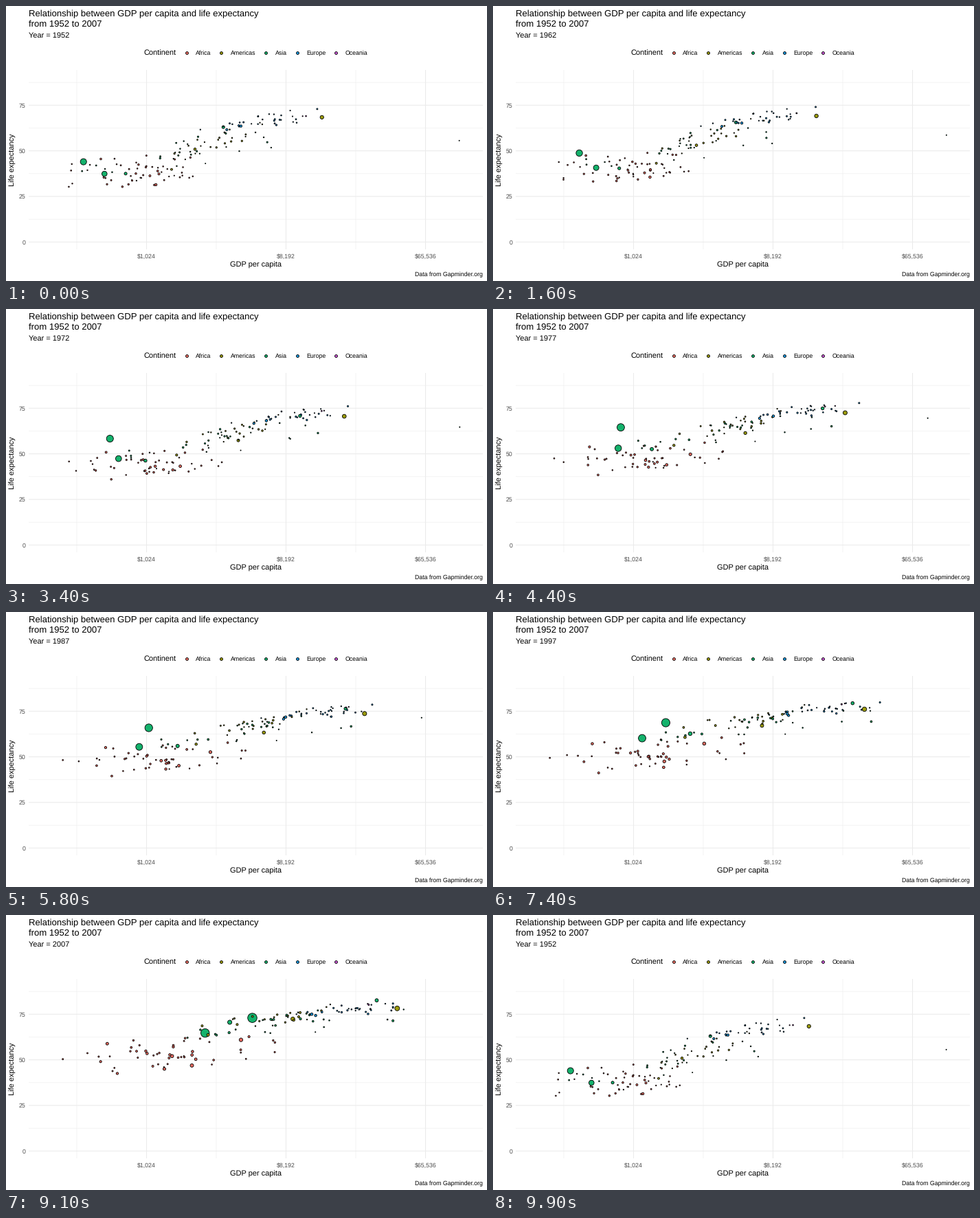
Animation of 700x400 px, one loop 10 s. Source, as a matplotlib script:

```python
import numpy as np
import matplotlib.pyplot as plt
from matplotlib.animation import FuncAnimation

W, H, DPI = 700, 400, 100
PT = 72 / DPI
STROKE = .85 * PT
plt.rcParams["font.family"] = "Liberation Sans"
plt.rcParams["text.hinting"] = "none"

COLORS = {"Africa": "#EC6C62", "Americas": "#9C9C0C", "Asia": "#14B26C",
          "Europe": "#1898E0", "Oceania": "#CC58D8"}
YEARS = np.arange(1952, 2008, 5)
AGE = (YEARS - 1952) / 55
KEYS = [1952, 1972, 1992, 2007]
# First frame of each year's points; the label moves one frame ahead.
STARTS = np.cumsum([0, 8, 9, 9, 9, 9, 7, 8, 8, 8, 8, 8, 8])

# The countries that stand out: continent, population in millions at both
# ends, then GDP per capita and life expectancy at the key years.
LEADERS = [
    ("Asia", (556, 1319), (400, 677, 1656, 4959), (44, 63.1, 68.7, 73)),
    ("Asia", (372, 1110), (547, 724, 1164, 2452), (37.4, 50.7, 60.2, 64.7)),
    ("Asia", (82, 224), (750, 1111, 2383, 3541), (37.5, 49.2, 62.7, 70.6)),
    ("Asia", (86, 127), (3217, 14779, 26825, 31656), (63, 73.4, 79.4, 82.6)),
    ("Asia", (.2, 2.5), (108382, 109348, 34933, 47307), (55.6, 67.7, 75.2, 77.6)),
    ("Americas", (158, 301), (13990, 21806, 32004, 42952), (68.4, 71.3, 76.1, 78.2)),
    ("Americas", (57, 190), (2109, 4986, 6950, 9066), (50.9, 59.5, 67.1, 72.4)),
    ("Africa", (33, 135), (1077, 1698, 1620, 2014), (36.3, 42.8, 47.5, 46.9)),
]

# Everyone else: count, log2 GDP (mean, sd), its growth (mean, sd),
# life (mean, sd, per unit of log2 GDP), life gained (mean, sd), population growth.
CROWDS = {
    "Africa": (51, (9.9, .85), (.55, .8), (39, 4.5, 1.5), (14.5, 6), 3.1),
    "Americas": (23, (11.5, .65), (1.3, .5), (54, 4, 7), (18.5, 2), 2.4),
    "Asia": (28, (10.7, 1.1), (2.1, .8), (47, 5, 5), (23, 4), 2.8),
    "Europe": (30, (12.45, .7), (1.9, .3), (66, 2, 3.5), (11, 1), 1.3),
    "Oceania": (2, (13.35, .05), (1.45, .1), (69.2, .2, 0), (11.5, .5), 2.2),
}


def ease_out(t, power):
    return 1 - (1 - t) ** power


def leader(pop, gdp, life):
    first, last = pop
    return (np.interp(YEARS, KEYS, np.log2(gdp)), np.interp(YEARS, KEYS, life),
            first * (last / first) ** AGE)


def follower(rng, wealth, growth, health, gain, pop_growth):
    start, rise, luck, effort = np.clip(rng.normal(size=4), -1.8, 1.8)
    g = wealth[0] + wealth[1] * start
    g = g + (growth[0] + growth[1] * rise) * ease_out(AGE, 1.3)
    g = g + rng.normal(0, .07, len(YEARS))
    # Those who start behind catch up; faster growth also lengthens life.
    ahead = health[1] * luck + health[2] * wealth[1] * start
    gained = gain[0] + gain[1] * (.7 * effort + .5 * rise) - .45 * ahead
    life = health[0] + ahead + gained * ease_out(AGE, 1.6)
    pop = min(5 * np.exp(rng.normal(0, 1.1)), 50)
    return np.clip(g, 8.2, 15.3), np.clip(life, 30, 81.5), pop * pop_growth ** AGE


def px(log_gdp):
    return 204.5 + 67.67 * (log_gdp - 10)


def py(life):
    return 343.3 - 2.653 * life


def build():
    rng = np.random.default_rng(21)
    rows = [leader(*row[1:]) for row in LEADERS]
    fills = [COLORS[row[0]] for row in LEADERS]
    for continent, (count, *spec) in CROWDS.items():
        rows += [follower(rng, *spec) for _ in range(count)]
        fills += [COLORS[continent]] * count
    g, life, pop = (np.array(part) for part in zip(*rows))
    diameter = .92 + 12.57 * np.sqrt(pop / 1319)
    return px(g), py(life), (diameter * PT) ** 2, fills


X, Y, SIZES, FILLS = build()

fig = plt.figure(figsize=(W / DPI, H / DPI), dpi=DPI, facecolor="white")
ax = fig.add_axes([0, 0, 1, 1])
ax.set_xlim(0, W)
ax.set_ylim(H, 0)
ax.axis("off")


def label(x, y, text, size, color="black", **kw):
    return ax.text(x, y, text, fontsize=size * PT, color=color, **kw)


def grid(power=None, life=None, width=1.07):
    xs = (33, 694) if power is None else (px(power),) * 2
    ys = (93, 354) if life is None else (py(life),) * 2
    ax.plot(xs, ys, color="#EBEBEB", lw=width * PT, zorder=1,
            solid_capstyle="butt", snap=False)


for power in (8.5, 11.5, 14.5):
    grid(power=power, width=.53)
for life in (12.5, 37.5, 62.5, 87.5):
    grid(life=life, width=.53)
for power in (10, 13, 16):
    grid(power=power)
    label(px(power), 367, f"${2 ** power:,}", 8.8, "#4D4D4D", ha="center")
for life in (0, 25, 50, 75):
    grid(life=life)
    label(28.5, py(life) + 3.3, str(life), 8.8, "#4D4D4D", ha="right")

label(33, 15.3, "Relationship between GDP per capita and life expectancy", 13.12)
label(33, 30, "from 1952 to 2007", 13.12)
subtitle = label(33, 46, "", 11)
label(363.3, 379.4, "GDP per capita", 11, ha="center")
label(10, 223.5, "Life expectancy", 11, rotation=90, ha="center", va="center")
label(694, 393, "Data from Gapminder.org", 8.8, ha="right")

label(200.5, 72, "Continent", 11)
for (name, color), x in zip(COLORS.items(), (262.5, 313, 378, 423.5, 480)):
    ax.scatter(x, 67.8, s=(3.9 * PT) ** 2, c=color, edgecolors="black",
               linewidths=STROKE)
    label(x + 13.8, 71.2, name, 8.8)

dots = ax.scatter(X[:, 0], Y[:, 0], s=SIZES[:, 0], c=FILLS,
                  edgecolors="black", linewidths=STROKE, zorder=3)


def state(frame):
    return (np.searchsorted(STARTS, frame, side="right") - 1) % len(YEARS)


def update(frame):
    now = state(frame)
    dots.set_offsets(np.column_stack([X[:, now], Y[:, now]]))
    dots.set_sizes(SIZES[:, now], DPI)
    subtitle.set_text(f"Year = {YEARS[state(frame + 1)]}")
    return dots, subtitle


anim = FuncAnimation(fig, update, frames=100, interval=100, repeat=True,
                     repeat_delay=0, init_func=lambda: update(0))
plt.show()
```
